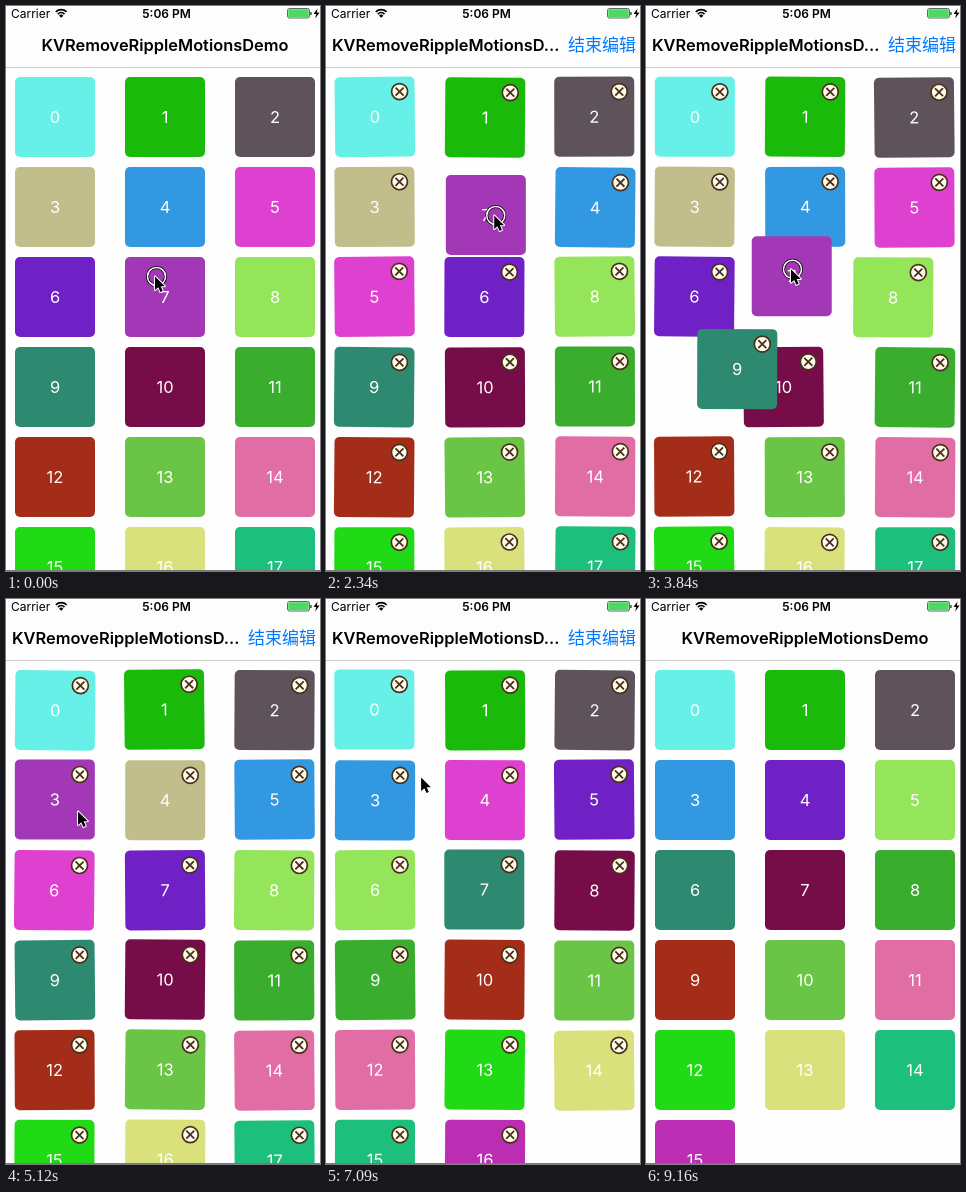
An HTML page with a canvas that plays this animation: 314 by 565 pixels, repeating every 9670 ms.

```html
<!DOCTYPE html>
<html lang="zh">
<head>
<meta charset="utf-8">
<style>
html, body { margin: 0; width: 100%; height: 100%; overflow: hidden; background: #fff; }
canvas { display: block; width: 314px; height: 565px; }
</style>
</head>
<body>
<canvas id="stage"></canvas>
<script>
const W = 314, H = 565, LOOP = 9670;
const EDIT_ON = 1090, DROP = 4780, EDIT_OFF = 8600, HELD = 7;
const SANS = 'Inter, Roboto, sans-serif';
const CJK = '"Noto Sans CJK SC", "Noto Sans CJK", sans-serif';
const COLORS = ['#66f0e8', '#1aba0b', '#5e535b', '#c2be8b', '#3398e2', '#de41d0', '#7021c5',
  '#a238b5', '#94e55a', '#2d8a70', '#760d48', '#3aad2e', '#a32d18', '#6ac547',
  '#e16da5', '#1fda15', '#d9e17c', '#1cbf7c', '#bb2eb4'];

// Pointer path: time, x, y
const PATH = [
  [0, 149, 270], [80, 150, 270], [1150, 150, 270], [1700, 146, 214], [2050, 140, 210],
  [2240, 142, 209], [2340, 168, 209], [2440, 192, 210], [2580, 186, 222], [2850, 160, 290],
  [3250, 155, 370], [3450, 152, 368], [3840, 145, 263], [3950, 137, 238], [4300, 76, 212],
  [4500, 72, 212], [5120, 72, 212], [5500, 72, 190], [5700, 71, 183], [6350, 73, 180],
  [6800, 76, 180], [7090, 95, 178], [7450, 182, 180], [7800, 183, 179], [8250, 268, 4],
  [8450, 274, 38], [8620, 274, 40], [8750, 272, 46], [8960, 264, 63], [9160, 316, 567]
];
const PRESSES = [[0, DROP], [5580, 5700], [6230, 6350], [7450, 7560], [8500, 8600]];

// Each step reorders the grid; labels refresh at `relabel`
const first = COLORS.map((_, i) => i);
const steps = [{ t: -1000, d: 1, order: first, relabel: -1000 }];
const lastOrder = () => steps[steps.length - 1].order;
function move(t, slot) {
  const order = lastOrder().filter(id => id !== HELD);
  order.splice(slot, 0, HELD);
  steps.push({ t, d: 300, order, relabel: Infinity });
}
function remove(t, id) {
  steps.push({ t, d: 500, order: lastOrder().filter(i => i !== id), relabel: t + 500 });
}
move(1550, 4);
move(2740, 7);
move(3080, 10);
move(3626, 7);
move(4100, 3);
steps.push({ t: DROP, d: 1, order: lastOrder(), relabel: DROP + 250 });
remove(5712, 7);
remove(6350, 3);
remove(7560, 5);

const canvas = document.getElementById('stage');
const g = canvas.getContext('2d');
const dpr = window.devicePixelRatio || 1;
canvas.width = W * dpr;
canvas.height = H * dpr;

const ease = x => { x = Math.min(1, Math.max(0, x)); return x * x * (3 - 2 * x); };
const mix = (a, b, p) => a + (b - a) * p;
const slotX = i => 49 + 110 * (i % 3);
const slotY = i => 111 + 90 * Math.floor(i / 3);

// Monotone cubic through the path points
function slope(i, k) {
  const rate = j => (PATH[j + 1][k] - PATH[j][k]) / (PATH[j + 1][0] - PATH[j][0]);
  if (i < 1 || i > PATH.length - 2) return 0;
  const a = rate(i - 1), b = rate(i);
  return a * b > 0 ? 2 * a * b / (a + b) : 0;
}
function pointer(t) {
  const n = PATH.length - 1;
  if (t <= 0) return PATH[0].slice(1);
  if (t >= PATH[n][0]) return PATH[n].slice(1);
  let i = 0;
  while (PATH[i + 1][0] <= t) i++;
  const p = PATH[i], q = PATH[i + 1], d = q[0] - p[0], u = (t - p[0]) / d;
  return [1, 2].map(k => mix(p[k], q[k], ease(u)) +
    d * u * (1 - u) * ((1 - u) * slope(i, k) - u * slope(i + 1, k)));
}

function text(str, x, y, font, color, align = 'left') {
  g.font = font;
  g.fillStyle = color;
  g.textAlign = align;
  g.textBaseline = 'alphabetic';
  g.fillText(str, x, y);
}

function locate(id, t) {
  const c = { id, x: slotX(id), y: slotY(id), alpha: 1, layer: 0, label: id };
  for (const s of steps) {
    if (t < s.t) break;
    const i = s.order.indexOf(id), p = ease((t - s.t) / s.d);
    if (i < 0) { c.alpha = 1 - p; break; }
    if (p < 1 && Math.abs(slotY(i) - c.y) > 1) c.layer = 1;
    c.x = mix(c.x, slotX(i), p);
    c.y = mix(c.y, slotY(i), p);
    if (t >= s.relabel) c.label = i;
  }
  if (id === HELD && t >= EDIT_ON && t < DROP + 250) {
    const w = ease((t - EDIT_ON) / 200) - ease((t - DROP) / 250);
    const [x, y] = pointer(t - 28);
    c.x = mix(c.x, x, w);
    c.y = mix(c.y, y, w);
    c.layer = 2;
  }
  return c;
}

function deleteBadge() {
  g.beginPath();
  g.arc(25, -25, 8, 0, 7);
  g.fillStyle = '#fffdf0';
  g.fill();
  g.strokeStyle = '#4c2f17';
  g.lineWidth = 1.7;
  g.stroke();
  g.beginPath();
  g.moveTo(21, -29); g.lineTo(29, -21);
  g.moveTo(29, -29); g.lineTo(21, -21);
  g.lineWidth = 1.8;
  g.stroke();
}

function drawCell(c, t, editing) {
  const shaking = editing && c.layer < 2;
  g.save();
  g.globalAlpha = c.alpha;
  g.translate(c.x, c.y);
  if (shaking) {
    const a = t / 240 * 2 * Math.PI + c.id * 2.4;
    g.translate(-0.3 + 0.5 * Math.cos(a * 0.8), 0.5 * Math.sin(a * 0.9 + 1));
    g.rotate(0.01 * Math.sin(a));
  }
  g.beginPath();
  g.roundRect(-40, -40, 80, 80, 5);
  g.fillStyle = COLORS[c.id];
  g.fill();
  text(c.label, 0, 6, '400 16.5px ' + SANS, '#fff', 'center');
  if (shaking) deleteBadge();
  g.restore();
}

function drawBars(t, editing) {
  g.fillStyle = '#fdfdfd';
  g.fillRect(0, 0, W, 61);
  g.fillStyle = '#cfcfcf';
  g.fillRect(0, 61, W, 1);

  text('Carrier', 5, 11.5, '400 12px ' + SANS, '#000');
  text('5:06 PM', 160.5, 11.5, '600 12px ' + SANS, '#000', 'center');

  g.strokeStyle = '#000';
  g.lineWidth = 1.7;
  for (const r of [4.6, 7.6]) {
    g.beginPath();
    g.arc(55.2, 11.3, r, -Math.PI * 0.75, -Math.PI * 0.25);
    g.stroke();
  }
  g.beginPath();
  g.moveTo(55.2, 11.8);
  g.arc(55.2, 11.8, 3, -Math.PI * 0.75, -Math.PI * 0.25);
  g.fillStyle = '#000';
  g.fill();

  g.beginPath();
  g.roundRect(281.5, 2.5, 22, 9.5, 2);
  g.strokeStyle = '#222';
  g.lineWidth = 0.7;
  g.stroke();
  g.beginPath();
  g.roundRect(282.3, 3.3, 20.4, 7.9, 1);
  g.fillStyle = '#4cd964';
  g.fill();
  g.fillStyle = '#333';
  g.fillRect(304.3, 6, 1.3, 3);
  g.fillStyle = '#000';
  g.fill(new Path2D('M311.5 2.5 L307.5 8 H310.2 L309.2 12.5 L313.6 6.6 H310.8 Z'));

  const font = '600 16.4px ' + SANS;
  if (editing) {
    text('KVRemoveRippleMotionsD...', 6, 45, font, '#000');
    g.globalAlpha = ease((t - EDIT_ON) / 150);
    text('结束编辑', 242, 45, '400 17px ' + CJK, '#007aff');
    g.globalAlpha = 1;
  } else {
    text('KVRemoveRippleMotionsDemo', 159, 45, font, '#000', 'center');
  }
}

const ARROW = new Path2D('M0 0.5 V14 L3.2 11.2 L5.4 16 L7.7 15 L5.6 10.3 H9.8 Z');
function drawPointer(t) {
  if (t >= 9160) return;
  const [x, y] = pointer(t);
  g.save();
  g.translate(x, y);
  if (PRESSES.some(([a, b]) => t >= a && t < b)) {
    g.beginPath();
    g.arc(1.5, 0.5, 9, 0, 7);
    g.strokeStyle = '#000';
    g.lineWidth = 3;
    g.stroke();
    g.strokeStyle = '#fff';
    g.lineWidth = 1.5;
    g.stroke();
  }
  g.strokeStyle = '#fff';
  g.lineWidth = 2;
  g.lineJoin = 'round';
  g.stroke(ARROW);
  g.fillStyle = '#000';
  g.fill(ARROW);
  g.restore();
}

function draw(t) {
  const editing = t >= EDIT_ON && t < EDIT_OFF;
  g.setTransform(dpr, 0, 0, dpr, 0, 0);
  g.fillStyle = '#fefefe';
  g.fillRect(0, 0, W, H);
  first.map(id => locate(id, t))
    .filter(c => c.alpha > 0)
    .sort((a, b) => a.layer - b.layer)
    .forEach(c => drawCell(c, t, editing));
  drawBars(t, editing);
  g.fillStyle = '#777';
  g.fillRect(0, 564, W, 1);
  drawPointer(t);
}

const start = performance.now();
function tick() {
  draw((performance.now() - start) % LOOP);
  requestAnimationFrame(tick);
}
tick();
</script>
</body>
</html>
```
